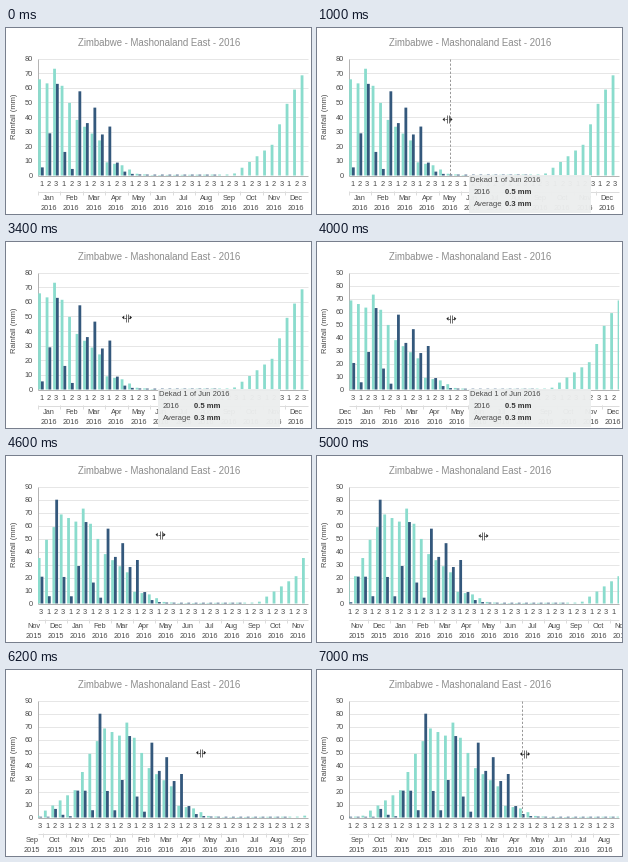
Write a matplotlib script that moves like this. It is 305x186 px and loops after 7.2 s.

```python
import numpy as np
import matplotlib.pyplot as plt
from matplotlib.animation import FuncAnimation
from matplotlib.patches import Polygon, Rectangle

W, H, DPI = 305, 186, 64
STEP, LOOP = 200, 7200
LEFT, RIGHT, TOP, BASE = 31.5, 301.5, 30.5, 147.5
PT = 72 / DPI  # points per pixel

TEAL, NAVY = "#8adccd", "#34587c"
INK, GREY, GRID = "#4a4a4a", "#8c8c8c", "#e6e6e6"
MONTHS = "Jan Feb Mar Apr May Jun Jul Aug Sep Oct Nov Dec".split()

HOVER, GRAB, DRAG, DROP = 600, 3200, 3800, 6800
SHIFT = 11.65  # dekads panned in one drag

# turning points of the mean year, by dekad
SEASON = {1: 63, 2: 73, 5: 38, 8: 24, 9: 9, 11: 7, 13: 1.2,
          15: 0.3, 25: 0.7, 26: 1.4, 31: 21, 33: 49, 35: 68.5}
# storms by dekad; each leaves a quarter of its rain to the next dekad
STORMS = {-8: 6, -5: 20, -4: 15, -2: 78, 1: 27, 2: 55,
          5: 56, 6: 21, 7: 37, 8: 16, 9: 26}

dekads = np.arange(-14, 36)
average = np.interp(dekads, list(SEASON), list(SEASON.values()), period=36)
past = np.arange(-12, 24)
measured = 0.6 + sum(mm * np.where(past >= at, 0.25 ** np.abs(past - at), 0)
                     for at, mm in STORMS.items())

plt.rcParams["font.family"] = "Liberation Sans"
fig = plt.figure(figsize=(W / DPI, H / DPI), dpi=DPI, facecolor="white")
ax = fig.add_axes([0, 0, 1, 1])


def ease(p):
    p = np.clip(p, 0, 1)
    return p + 0.48 * p * (1 - p)


def view(t):
    """First dekad at the left edge and pixels per dekad."""
    e = ease((t - DRAG) / (7000 - DRAG))
    span = 36 + 0.9 * np.sin(np.pi * e)
    return -SHIFT * e, (RIGHT - LEFT) / span


def pointer(t):
    if t < GRAB:
        e = np.clip((t - HOVER) / 1200, 0, 1)
        e *= 2 - e
        return 150 - 35 * e, 112 - 37 * e
    lead = np.clip((t - GRAB + STEP) / (DRAG - GRAB + STEP), 0, 1)
    e = ease((t - DRAG) / (7000 - DRAG))
    return 115 + 12 * lead + 81 * e, 75 + lead + 8 * e


def text(x, y, s, size=7.4, color=INK, ha="center",
         va="center_baseline", **kw):
    ax.text(x, y, s, fontsize=size * PT, color=color, ha=ha, va=va, **kw)


def line(xs, ys, color=GRID, width=1, **kw):
    ax.plot(xs, ys, color=color, lw=width * PT, solid_capstyle="butt", **kw)


def draw_axes(top):
    for v in range(0, top + 1, 10):
        y = BASE - (BASE - TOP) * v / top
        line([LEFT, RIGHT], [y, y], "#b4b4b4" if v == 0 else GRID)
        text(27, y, str(v), ha="right")
    line([LEFT, LEFT], [TOP, BASE], "#b4b4b4")
    text(9, 88, "Rainfall (mm)", 7.6, rotation=90, va="center")
    text(153, 14, "Zimbabwe - Mashonaland East - 2016", 9.6, GREY)


def draw_bars(place, top):
    clip = Rectangle((LEFT, 20), RIGHT - LEFT, 130, transform=ax.transData)
    scale = (BASE - TOP) / top
    for idx, mm, side, color in ((dekads, average, -1.7, TEAL),
                                 (past, measured, 1.1, NAVY)):
        bars = ax.bar(place(idx + 0.5) + side, -mm * scale, width=2.8,
                      bottom=BASE, color=color, lw=0, snap=False, zorder=3)
        for bar in bars:
            bar.set_clip_path(clip)


def draw_labels(place):
    shown = [i for i in dekads if 29 < place(i + 0.5) < RIGHT]
    for i in shown:
        text(place(i + 0.5), 156, str(i % 3 + 1))
    line([LEFT, RIGHT], [163.5, 163.5], "#dcdcdc")
    for m in sorted({i // 3 for i in shown}):
        x, edge = place(3 * m + 1.5), place(3 * m)
        text(x, 170, MONTHS[m % 12])
        text(x, 180, str(2016 + m // 12))
        if edge >= LEFT - 1:
            line([edge, edge], [163, 167], "#dcdcdc")


def draw_tooltip():
    ax.add_patch(Rectangle((152, 147), 122, 38, fc="#eceeee", lw=0,
                           alpha=0.96, zorder=6))
    text(153, 152, "Dekad 1 of Jun 2016", 7.6, ha="left", zorder=7)
    for y, name, value in ((164, "2016", "0.5 mm"), (175, "Average", "0.3 mm")):
        text(157, y, name, 7.6, ha="left", zorder=7)
        text(188, y, value, 7.6, "#333333", ha="left", weight="bold", zorder=7)


def draw_pointer(x, y):
    for side in (-1, 1):
        line([x + side] * 2, [y - 4, y + 4], "#333333", 0.7, zorder=9)
        line([x + side, x + 3 * side], [y, y], "#333333", 0.7, zorder=9)
        ax.add_patch(Polygon([(x + 5 * side, y), (x + 2.8 * side, y - 2),
                              (x + 2.8 * side, y + 2)],
                             fc="#222222", lw=0, zorder=9))


def draw(k):
    t = k * STEP
    ax.cla()
    ax.axis("off")
    ax.set(xlim=(0, W), ylim=(H, 0))
    ax.set_autoscale_on(False)

    start, pitch = view(t)

    def place(i):
        return LEFT + (i - start) * pitch

    top = 90 if start < 0 else 80
    draw_axes(top)
    draw_bars(place, top)
    draw_labels(place)

    if t >= HOVER:
        x, y = pointer(t)
        if t < GRAB or t >= DROP:
            cross = place(np.floor((x - LEFT) / pitch + start) + 0.5)
            line([cross, cross], [TOP, BASE], "#8f8f8f", 0.9,
                 dashes=(2.5, 2), zorder=4)
        if t < 4400:
            draw_tooltip()
        draw_pointer(x, y)
    return []


anim = FuncAnimation(fig, draw, frames=LOOP // STEP, interval=STEP,
                     init_func=lambda: [], repeat=True, repeat_delay=0)
plt.show()
```
